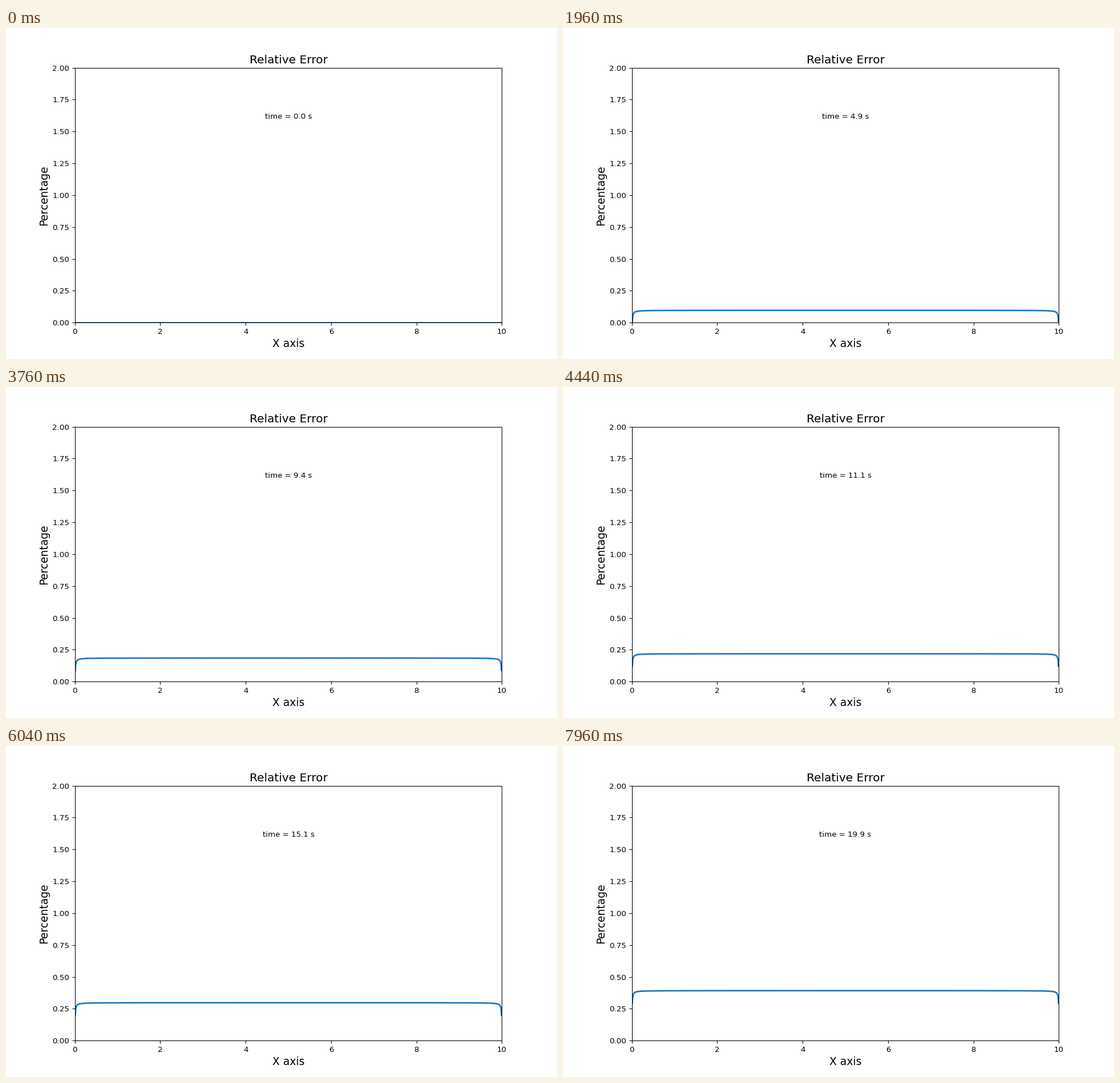
Write a matplotlib script that moves like this. It is 966 px wide and 580 px high and loops after 8000 ms.

```python
import numpy as np
import matplotlib.pyplot as plt
from matplotlib.animation import FuncAnimation

WIDTH, HEIGHT = 966, 580
DPI = 96.6         # a 10 inch wide figure
FRAMES = 200
INTERVAL = 40      # ms
DT = 0.1           # simulated seconds per frame
LENGTH = 10.0
STEP = 0.01
GROWTH = 0.0197    # error gained per simulated second
EDGE = 0.0993      # offset at the outermost grid points

plt.rcParams["font.family"] = "DejaVu Sans"

x = np.linspace(STEP, LENGTH - STEP, 999)
edge_drop = EDGE * np.sin(np.pi * STEP / LENGTH) / np.sin(np.pi * x / LENGTH)


def relative_error(t):
    if t == 0:
        return np.zeros_like(x)
    return np.abs(GROWTH * t - edge_drop)


# the small margin keeps float rounding from losing a pixel row
fig, ax = plt.subplots(figsize=((WIDTH + 0.01) / DPI, (HEIGHT + 0.01) / DPI),
                       dpi=DPI)
ax.set_xlim(0, LENGTH)
ax.set_ylim(0, 2)
ax.set_title("Relative Error", fontsize=15)
ax.set_xlabel("X axis", fontsize=14)
ax.set_ylabel("Percentage", fontsize=14)

line, = ax.plot([], [], color="tab:blue", lw=2)
clock = ax.text(5, 1.6, "", ha="center", fontsize=10)


def update(i):
    t = i * DT
    line.set_data(x, relative_error(t))
    clock.set_text(f"time = {t:.1f} s")
    return line, clock


anim = FuncAnimation(fig, update, frames=FRAMES, interval=INTERVAL,
                     repeat=True, repeat_delay=0, blit=False)
plt.show()
```
